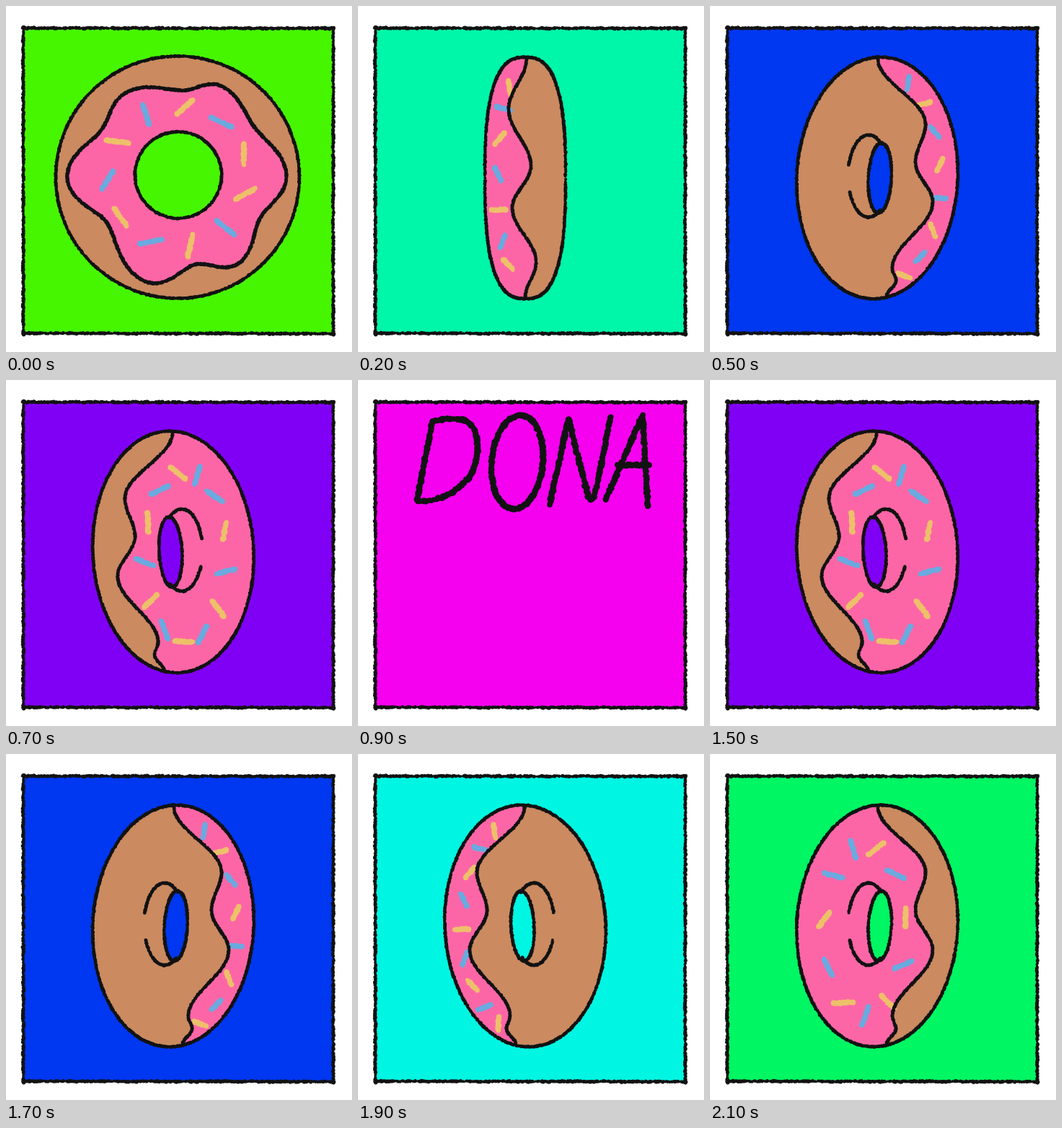
Animation, 480 px wide and 480 px high, one loop 2200 ms. Source, as an HTML page with a canvas:

```html
<!DOCTYPE html>
<html lang="en">
<head>
<meta charset="utf-8">
<title>Spinning doughnut</title>
<style>
html, body { margin: 0; width: 100%; height: 100%; overflow: hidden; background: #fff; }
canvas { display: block; width: 480px; height: 480px; }
</style>
</head>
<body>
<canvas id="stage" width="480" height="480"></canvas>
<script>
const ctx = document.getElementById('stage').getContext('2d');
const INK = '#121212', PINK = '#fd66a6', DOUGH = '#cb8a60';
const SPRINKLES = ['#edc06a', '#6aaae0'];
const BACK = ['#46f600', '#00f662', '#00f6a8', '#00f6e2', '#00a0f6', '#0037f0',
  '#3c00f6', '#8000f6', '#be00f6', '#f600f0', '#f600be', '#f60088'];
const STEP = 100, LAST = 11, AXIS = 232, RAD = Math.PI / 180;

let seed = 1;
function rnd() {
  seed = (seed * 16807) % 2147483647;
  return seed / 2147483647;
}

function line(x1, y1, x2, y2) {
  const n = Math.ceil(Math.hypot(x2 - x1, y2 - y1));
  return Array.from({ length: n + 1 }, (_, i) =>
    [x1 + (x2 - x1) * i / n, y1 + (y2 - y1) * i / n]);
}

// Catmull-Rom curve through a few points
function spline(p) {
  const out = [], at = i => p[Math.max(0, Math.min(p.length - 1, i))];
  for (let i = 0; i < p.length - 1; i++) {
    const [a, b, c, d] = [at(i - 1), at(i), at(i + 1), at(i + 2)];
    const n = Math.ceil(Math.hypot(c[0] - b[0], c[1] - b[1]));
    for (let j = 0; j < n; j++) {
      const t = j / n;
      out.push([0, 1].map(k => b[k] + t * (c[k] - a[k]) / 2 +
        t * t * (a[k] - 2.5 * b[k] + 2 * c[k] - d[k] / 2) +
        t * t * t * (1.5 * (b[k] - c[k]) + (d[k] - a[k]) / 2)));
    }
  }
  return out;
}

// cosine easing between turning points given as [value, position]
function swing(keys, step) {
  const out = [];
  for (let i = 0; i < keys.length - 1; i++) {
    const [v, from] = keys[i], [w, to] = keys[i + 1];
    for (let t = from; t < to; t += step) {
      out.push([v + (w - v) * (1 - Math.cos((t - from) / (to - from) * Math.PI)) / 2, t]);
    }
  }
  return out;
}

// ellipse or part of one; a power under 1 makes it squarer
function oval(cx, cy, rx, ry, tilt = 0, from = 0, to = 360, power = 1) {
  const c = Math.cos(tilt), s = Math.sin(tilt);
  const bend = v => Math.sign(v) * Math.abs(v) ** power;
  const n = Math.ceil(Math.abs(to - from) * RAD * Math.max(rx, ry));
  return Array.from({ length: n }, (_, i) => {
    const a = (from + (to - from) * i / n) * RAD;
    const x = rx * bend(Math.cos(a)), y = ry * bend(Math.sin(a));
    return [cx + x * c - y * s, cy + x * s + y * c];
  });
}

function trace(p) {
  ctx.beginPath();
  p.forEach(([x, y]) => ctx.lineTo(x, y));
  ctx.closePath();
}

function fill(p, color) {
  trace(p);
  ctx.fillStyle = color;
  ctx.fill();
}

// crayon-like stroke built from uneven dots
function rough(p, width = 4.4, wobble = 0.9, color = INK) {
  ctx.fillStyle = color;
  ctx.beginPath();
  for (const [x, y] of p) {
    const r = width / 2 + (rnd() - 0.5) * wobble;
    const cx = x + (rnd() - 0.5) * wobble, cy = y + (rnd() - 0.5) * wobble;
    ctx.moveTo(cx + r, cy);
    ctx.arc(cx, cy, r, 0, 7);
  }
  ctx.fill();
}

// sprinkles spaced evenly along an arc (degrees clockwise from the top),
// alternating in colour, each turned further than the one before
function sprinkle({ cx, cy, rx, ry, from, gap, count, tilt, first = 0, size = 26 }) {
  for (let i = 0; i < count; i++) {
    const a = (from + i * gap) * RAD, turn = (tilt + i * 66) * RAD;
    const x = cx + rx * Math.sin(a), y = cy - ry * Math.cos(a);
    const dx = Math.cos(turn) * size / 2, dy = Math.sin(turn) * size / 2;
    rough(line(x - dx, y - dy, x + dx, y + dy), 6.8, 1.4, SPRINKLES[(i + first) % 2]);
  }
}

const ring = count => ({ cx: 215, cy: 245, rx: 57, ry: 118, from: -17, gap: 360 / count,
  count, tilt: 74, first: 1 });
const crescent = (count, first) => ({ cx: AXIS, cy: 238, rx: 88, ry: 150, from: 29,
  gap: 126 / (count - 1), count, tilt: 98, first, size: 19 });
const topRing = { cx: 238, cy: 237, rx: 97, ry: 97, from: 104, gap: 360 / 11,
  count: 11, tilt: -29, size: 31 };
const sideRow = { cx: 242, cy: 238, rx: 28, ry: 138, from: 25, gap: 21,
  count: 7, tilt: 98, size: 20 };

// lobes of the icing: radius at angle
const icing = swing([[120, 3], [140, 26], [127, 56], [151, 90], [128, 117], [147, 145],
  [124, 168], [152, 195], [117, 237], [153, 270], [124, 303], [137, 327], [120, 363]], 0.4)
  .map(([r, a]) => [238 + r * Math.sin(a * RAD), 237 - r * Math.cos(a * RAD)]);
const wave = swing([[233, 73], [299, 164], [285, 217], [309, 272], [253, 364],
  [258, 381], [245, 403]], 0.6);
const edgeWave = swing([[230, 72], [255, 143], [224, 222], [250, 280], [217, 355],
  [232, 405]], 0.6);
const edgeShape = oval(AXIS, 238.5, 56, 167.5, 0, 0, 360, 0.75);
const disc = oval(238, 237.5, 169, 168);
const leaning = oval(AXIS, 238.5, 111.6, 167.8, 0.053);
const slot = oval(235.7, 238.5, 16, 48.5, 0.05);
const lips = [oval(220, 236, 28.5, 57, 0, 196, 310), oval(220, 236, 28.5, 57, 0, 157, 54)];

function mirrored(on, draw) {
  ctx.save();
  if (on) {
    ctx.translate(2 * AXIS, 0);
    ctx.scale(-1, 1);
  }
  draw();
  ctx.restore();
}

function halves(shape, seam, left, right) {
  fill(shape, left);
  ctx.save();
  trace(shape);
  ctx.clip();
  fill([[seam[0][0], 50], ...seam, [seam[seam.length - 1][0], 425], [400, 425], [400, 50]], right);
  ctx.restore();
}

function flat(back, iced) {
  fill(disc, DOUGH);
  if (iced) {
    fill(icing, PINK);
    sprinkle(topRing);
    rough(icing, 5);
  }
  rough(disc);
  const hole = oval(239, 234.5, 60, 60);
  fill(hole, back);
  rough(hole);
}

function turned(back, face, side, flip, bits) {
  mirrored(flip, () => {
    halves(leaning, wave, face, side);
    fill(slot, back);
    sprinkle(bits);
    [leaning, wave, slot, ...lips].forEach(p => rough(p));
  });
}

function edge(flip) {
  mirrored(flip, () => {
    halves(edgeShape, edgeWave, DOUGH, PINK);
    sprinkle(sideRow);
    rough(edgeShape);
    rough(edgeWave);
  });
}

const letters = [
  line(103, 57, 82, 168),
  spline([[103, 57], [125, 54], [148, 56], [162, 71], [166, 98], [157, 130], [135, 153],
    [110, 165], [82, 169]]),
  oval(221, 114, 35.5, 65, 0.1),
  line(266, 172, 292, 54),
  spline([[292, 54], [312, 133], [323, 166], [333, 138], [350, 51]]),
  line(344, 165, 395, 48),
  line(395, 48, 402, 176),
  line(360, 118, 404, 118)
];
// left, top and scale of each line of lettering
const rows = [[82, 48, 1, 1], [87, 182, 0.916, 0.905], [64, 314, 0.978, 0.977]];

function words(count) {
  for (const [x, y, sx, sy] of rows.slice(0, count)) {
    for (const s of letters) {
      rough(s.map(p => [x + (p[0] - 82) * sx, y + (p[1] - 48) * sy]), 7.2, 2);
    }
  }
}

function border() {
  rough(line(24, 28, 24, 456), 4, 1.5);
  rough(line(22, 30.5, 455, 31), 4, 1.5);
  rough(line(454, 31, 454, 457), 4, 1.5);
  rough(line(23, 454, 456, 454.5), 4, 1.5);
}

const scenes = [
  c => flat(c, true),
  c => turned(c, PINK, DOUGH, false, ring(11)),
  () => edge(true),
  c => turned(c, DOUGH, PINK, true, crescent(9, 0)),
  c => flat(c, false),
  c => turned(c, DOUGH, PINK, false, crescent(8, 1)),
  () => edge(false),
  c => turned(c, PINK, DOUGH, true, ring(13)),
  c => flat(c, true),
  () => words(1),
  () => words(2),
  () => words(3)
];

function draw(n) {
  seed = 4711;
  ctx.fillStyle = '#fff';
  ctx.fillRect(0, 0, 480, 480);
  ctx.fillStyle = BACK[n];
  ctx.fillRect(24, 31, 430, 423);
  border();
  scenes[n](BACK[n]);
}

// the drawings run forward, then back
let shown = -1;
const start = performance.now();
function tick() {
  const k = Math.floor((performance.now() - start) / STEP) % (2 * LAST);
  const n = k <= LAST ? k : 2 * LAST - k;
  if (n !== shown) draw(shown = n);
  requestAnimationFrame(tick);
}
tick();
</script>
</body>
</html>
```
